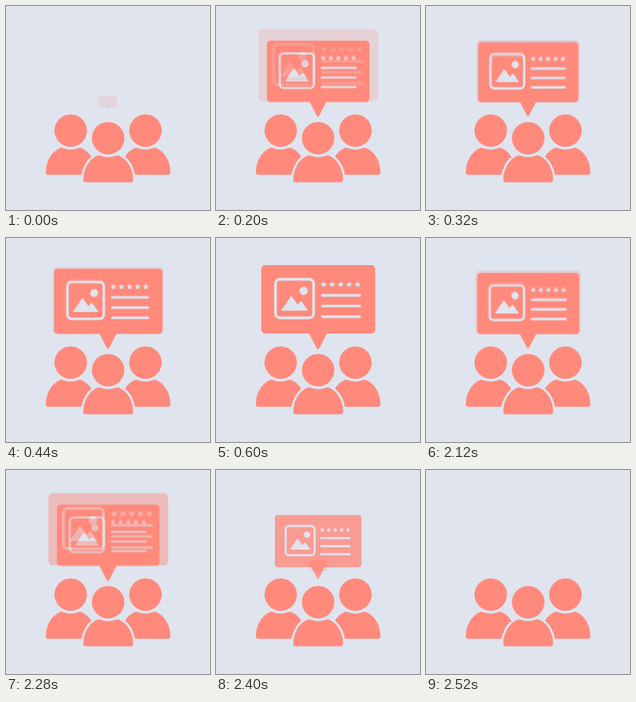
Write an HTML page that moves like this. It is 256 px wide and 256 px high and loops after 3400 ms.

```html
<!DOCTYPE html>
<html lang="en">
<head>
<meta charset="utf-8">
<title>Customer review</title>
<style>
  html, body { margin: 0; width: 100%; height: 100%; overflow: hidden; background: #dfe4ee; }
  svg { display: block; width: 100vw; height: 100vh; }
  .bg { fill: #dfe4ee; }
  .ink { fill: #ff8a7c; }
  .line { fill: none; stroke: #dfe4ee; stroke-width: 3.4; stroke-linecap: round; }
  .gap { stroke: #dfe4ee; stroke-width: 5.5; }
</style>
</head>
<body>
<svg viewBox="0 0 256 256">
  <defs>
    <path id="star" class="bg" d="M0-4.2 1.2-1.4 4.1-1.2 1.9.7 2.6 3.6 0 2-2.6 3.6-1.9.7-4.1-1.2-1.2-1.4Z"/>
    <path id="body" d="M97 218C97 205 104 191.500 115.500 187.500H141C152.500 191.500 159.500 205 159.500 218Q159.500 221.300 156.500 221.300H100Q97 221.300 97 218Z"/>
    <g id="person">
      <use href="#body"/>
      <circle class="bg" cx="128.200" cy="165.800" r="24"/>
      <circle cx="128.200" cy="165.800" r="20.400"/>
    </g>
    <g id="bubble">
      <rect class="ink" x="56.800" y="34" width="143" height="86" rx="5"/>
      <path class="ink" d="M116.500 119H139.500L129.700 138.300Q128 141 126.300 138.300Z"/>
      <rect class="line" x="74.700" y="51.800" width="47.800" height="48.400" rx="5.500"/>
      <circle class="bg" cx="109.900" cy="66.300" r="5.200"/>
      <path class="bg" d="M81.800 91.200 93.200 74.200Q94.500 72.500 95.800 74.200L102.300 83.500 105.500 80Q106.700 79 107.900 80L115.500 91.200Z"/>
      <g id="stars"></g>
      <path class="line" d="M133.500 72H180.300M133.500 85.400H180.300M133.500 98.800H180.300"/>
    </g>
  </defs>

  <rect class="bg" width="256" height="256"/>
  <use id="now" href="#bubble"/>
  <g id="blend">
    <rect class="bg" width="256" height="256"/>
    <use id="next" href="#bubble"/>
  </g>
  <g class="ink">
    <use href="#person" x="-47" y="-9.500"/>
    <use href="#person" x="46.800" y="-9.500"/>
    <use class="gap" href="#body"/>
    <use href="#person"/>
  </g>
</svg>
<script>
  const LOOP = 3400, TICK = 40, STEP = 43.5;
  // Bubble scale at each pose; neighbouring poses are cross-faded.
  const poses = [0, 0.154, 0.76, 1.2, 1.05, 0.9, 0.86, 0.87, 0.895, 0.925, 0.95, 0.968, 0.983, 0.996, 1];
  const last = poses.length - 1;
  const $ = id => document.getElementById(id);

  $("stars").innerHTML = [0, 1, 2, 3, 4]
    .map(i => `<use href="#star" x="${135.2 + 10.6 * i}" y="58.2"/>`).join("");

  function setScale(el, s) {
    el.setAttribute("transform", `translate(128 128) scale(${s}) translate(-128 -128)`);
  }

  function poseAt(t) {
    if (t >= 600 && t < 1920) return last;
    const p = t < 600 ? 0.2 + t / STEP : (2478 - t) / STEP;
    return Math.max(0, Math.min(last, p));
  }

  function draw(time) {
    const t = Math.floor((time % LOOP) / TICK) * TICK;
    const p = poseAt(t), i = Math.floor(p);
    setScale($("now"), poses[i]);
    setScale($("next"), poses[Math.min(i + 1, last)]);
    $("blend").setAttribute("opacity", p - i);
  }

  const start = performance.now();
  function tick() {
    draw(performance.now() - start);
    requestAnimationFrame(tick);
  }
  tick();
</script>
</body>
</html>
```
